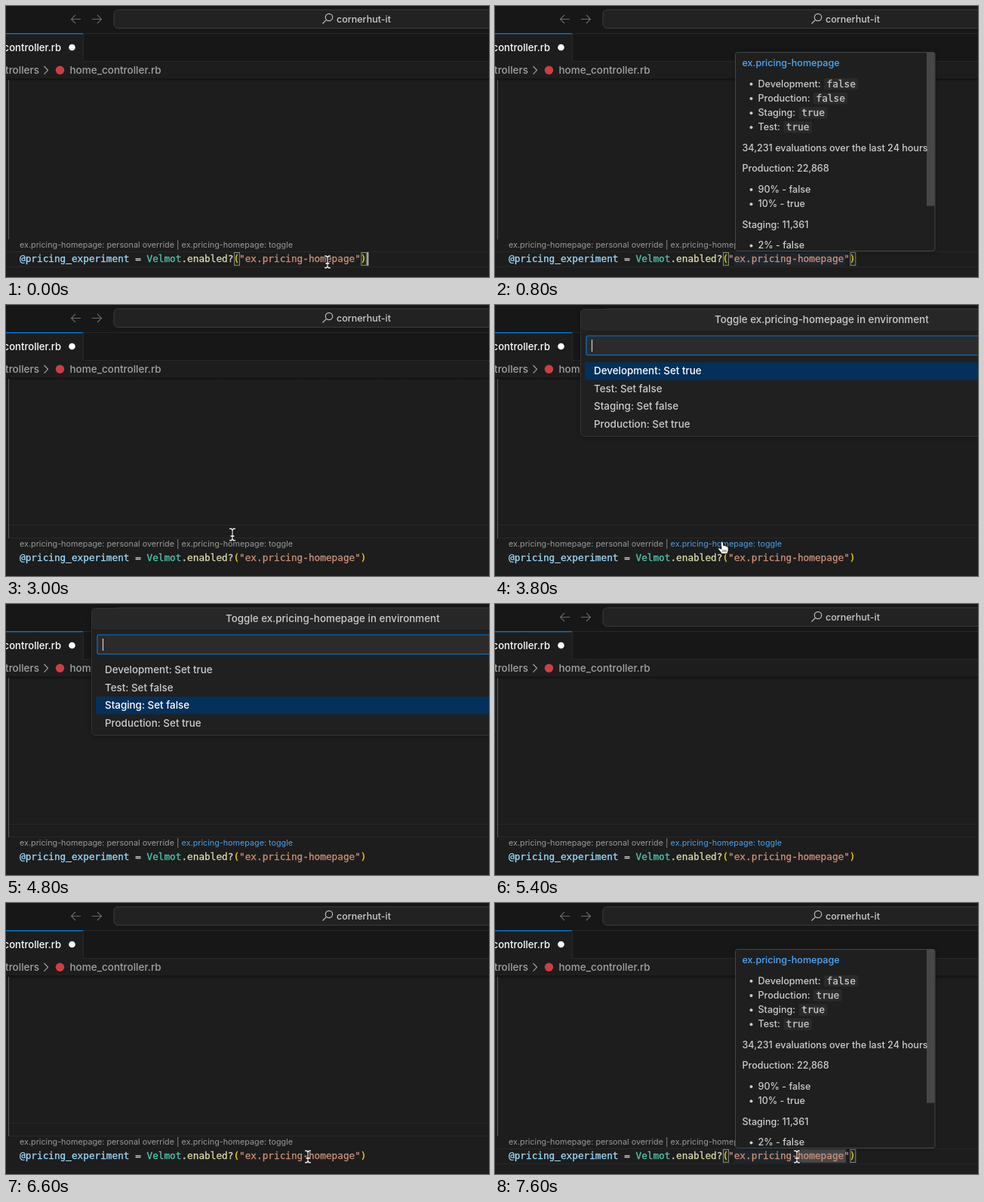
These frames come from a looping animation (640 px wide and 360 px high, 7.8 s). An HTML page:

```html
<!DOCTYPE html>
<html lang="en">
<head>
<meta charset="utf-8">
<title>Editor flag toggle</title>
<style>
  html, body { margin: 0; width: 100%; height: 100%; overflow: hidden; background: #1d1d1d; }
  svg { display: block; width: 640px; height: 360px; }
  text { font: 500 13.5px Inter, "Open Sans", sans-serif; color: #ccc; white-space: pre; }
  text, tspan { fill: currentColor; }
  .code, .value { font: 12.73px "DejaVu Sans Mono", monospace; stroke-width: .3; }
  .code, .code tspan, .value { stroke: currentColor; }
  .lens { font-size: 10.79px; font-weight: 400; color: #999; }
  .hover { font-size: 12.55px; }
  .pick { font-size: 13.4px; }
  .line { fill: none; stroke: #282828; }
  .bracket { fill: #1c2a1c; stroke: #858585; }
  .shadow { filter: drop-shadow(0 1px 3px rgba(0, 0, 0, .3)); }
  .pointer { stroke: #111; stroke-linejoin: round; fill: #fff; }
</style>
</head>
<body>
<svg viewBox="0 0 640 360">
  <rect width="640" height="360" fill="#1d1d1d"/>

  <!-- title bar -->
  <rect width="640" height="73" fill="#171717"/>
  <g id="arrows" fill="none" stroke="#686868" stroke-width="1.1">
    <path d="M99 17.5H87M92 12L86.5 17.5L92 23"/>
    <path d="M114 17.5H126M121 12L126.5 17.5L121 23"/>
  </g>
  <rect x="143" y="5" width="520" height="24.5" rx="5.5" fill="#222" stroke="#3c3c3c"/>
  <g fill="none" stroke="#bdbdbd" stroke-width="1.2">
    <circle cx="428" cy="15" r="4.7"/>
    <path d="M424.6 18.4L419.5 23.5"/>
  </g>
  <text x="438" y="21.5" style="font-size:12.5px">cornerhut-it</text>
  <path class="line" d="M0 36.5H640M102.5 37V73.5H640"/>

  <!-- tab and breadcrumbs -->
  <rect y="37" width="102" height="37" fill="#1d1d1d"/>
  <rect y="36" width="102" height="1.4" fill="#0078d4"/>
  <text x="73" y="60" text-anchor="end" style="font-size:13.1px;color:#fff">home_controller.rb</text>
  <circle cx="87.5" cy="55" r="4.3" fill="#fff"/>
  <text x="44" y="90.3" text-anchor="end" style="color:#a2a2a2">controllers</text>
  <path d="M50.5 80L55.5 85.3L50.5 90.6" fill="none" stroke="#a2a2a2" stroke-width="1.2"/>
  <circle cx="71.5" cy="85.3" r="5.7" fill="#cc3e44"/>
  <text x="84.5" y="90.3" style="color:#a2a2a2">home_controller.rb</text>
  <linearGradient id="fade" x2="0" y2="1">
    <stop stop-color="#111"/><stop offset="1" stop-color="#1d1d1d"/>
  </linearGradient>
  <rect y="96.5" width="640" height="4" fill="url(#fade)"/>
  <path d="M3.5 98V310" stroke="#5a5a5a"/>

  <!-- code -->
  <path id="codeLine" class="line" d="M0 326.5H640M0 346.5H640"/>
  <path id="blankLine" class="line" d="M4 292.5H640M4 309.5H640"/>
  <rect id="range" x="317" y="327" width="147.5" height="18" fill="#1f262d"/>
  <rect id="word" x="401" y="327" width="64" height="18" fill="#464749"/>
  <g id="brackets">
    <rect class="bracket" x="302.5" y="327.5" width="7" height="17"/>
    <rect class="bracket" x="470.8" y="327.5" width="7" height="17"/>
  </g>
  <text class="lens" x="18" y="321.3">ex.pricing-homepage: personal override | <tspan id="toggle">ex.pricing-homepage: toggle</tspan></text>
  <text class="code" x="18" y="340"><tspan color="#9cdcfe">@pricing_experiment</tspan> = <tspan color="#4ec9b0">Velmot</tspan>.<tspan color="#dcdcaa">enabled?</tspan><tspan color="#ffd700">(</tspan><tspan color="#ce9178">"ex.pricing-homepage"</tspan><tspan color="#ffd700">)</tspan></text>
  <rect id="caret" x="478.5" y="327" width="1.8" height="18" fill="#c4c4c4"/>

  <!-- hover card -->
  <g id="card">
    <rect class="shadow" x="318.5" y="61.5" width="264.5" height="264" rx="3" fill="#1f1f1f" stroke="#454545"/>
    <clipPath id="cardClip"><rect x="319" y="62" width="263.5" height="263"/></clipPath>
    <g id="cardText" clip-path="url(#cardClip)"></g>
    <rect x="572" y="62" width="10.5" height="203.5" fill="#797979" opacity=".45"/>
  </g>

  <!-- environment picker -->
  <g id="picker">
    <rect class="shadow" x="113.5" y="5.5" width="560" height="169" rx="5" fill="#202020" stroke="#343434"/>
    <rect x="114" y="6" width="560" height="28" rx="5" fill="#272727"/>
    <text class="pick" x="291" y="24.3">Toggle ex.pricing-homepage in environment</text>
    <rect x="121" y="41" width="560" height="25.5" rx="1.5" fill="#2b2b2b" stroke="#0078d4" stroke-width="1.2"/>
    <path d="M128.5 46V62" stroke="#d0d0d0" stroke-width="1.2"/>
    <rect id="selection" x="119" y="76" width="530" height="23.4" rx="1" fill="#04305a"/>
    <g id="rows"></g>
  </g>

  <!-- pointers, drawn around their hot spots -->
  <g id="beam" class="pointer">
    <path d="M-4.5 -9H-1.5L0 -7.8L1.5 -9H4.5V-6.8H2L1 -5.5V5.5L2 6.8H4.5V9H1.5L0 7.8L-1.5 9H-4.5V6.8H-2L-1 5.5V-5.5L-2 -6.8H-4.5Z" stroke-width=".9"/>
    <path d="M-2.5 2H2.5" stroke="#fff" stroke-width="1.5"/>
  </g>
  <g id="hand" class="pointer" stroke-width=".9">
    <path d="M-2.8 -7Q-1.4 -8.6 0 -7L.9 -2.3Q2.2 -3.3 3.3 -1.8Q4.7 -2.5 5.5 -.9Q7.2 -1 7.2 .9V3.9Q6.6 6.5 5.5 8.6H-1.6Q-3.3 5.5 -6 2.8Q-7 .7 -5 .6L-2 2.2Z"/>
    <path d="M0 3V6.5M2 3V6.5M4 3V6.5" stroke-width=".6"/>
  </g>
</svg>
<script>
const LOOP = 7800;
const ROW = 23.4;
const byId = id => document.getElementById(id);

function add(parent, tag, attrs, content = '') {
  const el = document.createElementNS('http://www.w3.org/2000/svg', tag);
  for (const name in attrs) el.setAttribute(name, attrs[name]);
  el.textContent = content;
  parent.append(el);
  return el;
}

// Holds each [time, value] until the next one.
function steps(el, prop, table) {
  const frames = table.map(([time, value]) =>
    ({ offset: time / LOOP, [prop]: value, easing: 'step-end' }));
  frames.push({ offset: 1, [prop]: table[table.length - 1][1] });
  el.animate(frames, { duration: LOOP, iterations: Infinity });
}

// Shows an element only inside the given [start, end] spans.
function show(el, ...spans) {
  const table = spans[0][0] > 0 ? [[0, 0]] : [];
  for (const [start, end] of spans) {
    table.push([start, 1]);
    if (end < LOOP) table.push([end, 0]);
  }
  steps(el, 'opacity', table);
}

const move = (el, table) =>
  steps(el, 'transform', table.map(([time, x, y]) => [time, `translate(${x}px, ${y}px)`]));

const card = byId('cardText');
const say = (x, y, content) => add(card, 'text', { class: 'hover', x, y }, content);

function bullet(y, content) {
  add(card, 'circle', { cx: 339.5, cy: y - 4, r: 2, fill: '#ccc' });
  say(348.5, y, content);
}

function chip(x, y, content) {
  const g = add(card, 'g', {});
  add(g, 'rect', { x, y: y - 12, width: content.length * 7.66 + 7, height: 15.5, rx: 2, fill: '#2a2a2a' });
  add(g, 'text', { class: 'value', x: x + 3.5, y }, content);
  return g;
}

say(327.5, 80.3, 'ex.pricing-homepage').style.color = '#4daafc';
bullet(107.8, 'Development:');
bullet(127, 'Production:');
bullet(146.2, 'Staging:');
bullet(165.2, 'Test:');
chip(436, 107.8, 'false');
const before = chip(422, 127, 'false');
const after = chip(422, 127, 'true');
chip(402.7, 146.2, 'true');
chip(382.3, 165.2, 'true');
say(327.5, 192.8, '34,231 evaluations over the last 24 hours');
say(327.5, 220.3, 'Production: 22,868');
bullet(248, '90% - false');
bullet(267.2, '10% - true');
say(327.5, 294.8, 'Staging: 11,361');
bullet(322.4, '2% - false');

const picks = [[3800, 4400], [4400, 4600], [4600, 5000], [5000, 5400]];
['Development: Set true', 'Test: Set false', 'Staging: Set false', 'Production: Set true']
  .forEach((label, i) => {
    const row = add(byId('rows'), 'text', { class: 'pick', x: 131, y: 92.4 + i * ROW }, label);
    const [start, end] = picks[i];
    steps(row, 'color', [[0, '#ccc'], [start, '#fff'], [end, '#ccc']]);
  });
move(byId('selection'), [[0, 0, 0], ...picks.map(([start], i) => [start, 0, i * ROW])]);

show(byId('card'), [600, 2800], [6800, LOOP]);
show(before, [0, 5400]);
show(after, [5400, LOOP]);
show(byId('range'), [600, 2800], [6800, LOOP]);
show(byId('word'), [7600, LOOP]);
show(byId('brackets'), [0, 2800], [6800, LOOP]);
show(byId('codeLine'), [0, 2800], [6800, LOOP]);
show(byId('blankLine'), [2800, 6800]);
show(byId('caret'), [0, 600], [1000, 1600], [2000, 2600]);
show(byId('picker'), [3800, 5400]);
show(byId('arrows'), [0, 3800], [5400, LOOP]);
steps(byId('toggle'), 'color', [[0, '#999'], [3400, '#4a9fe8'], [6200, '#999']]);

show(byId('beam'), [0, 600], [2600, 3400], [6400, 6800], [7600, LOOP]);
move(byId('beam'), [[0, 426, 340], [2600, 372, 326], [2800, 318, 309], [3000, 300, 305],
  [3200, 300, 308], [6400, 372, 332], [6600, 400, 337]]);
show(byId('hand'), [3400, 4200]);
move(byId('hand'), [[0, 302, 322]]);
</script>
</body>
</html>
```
